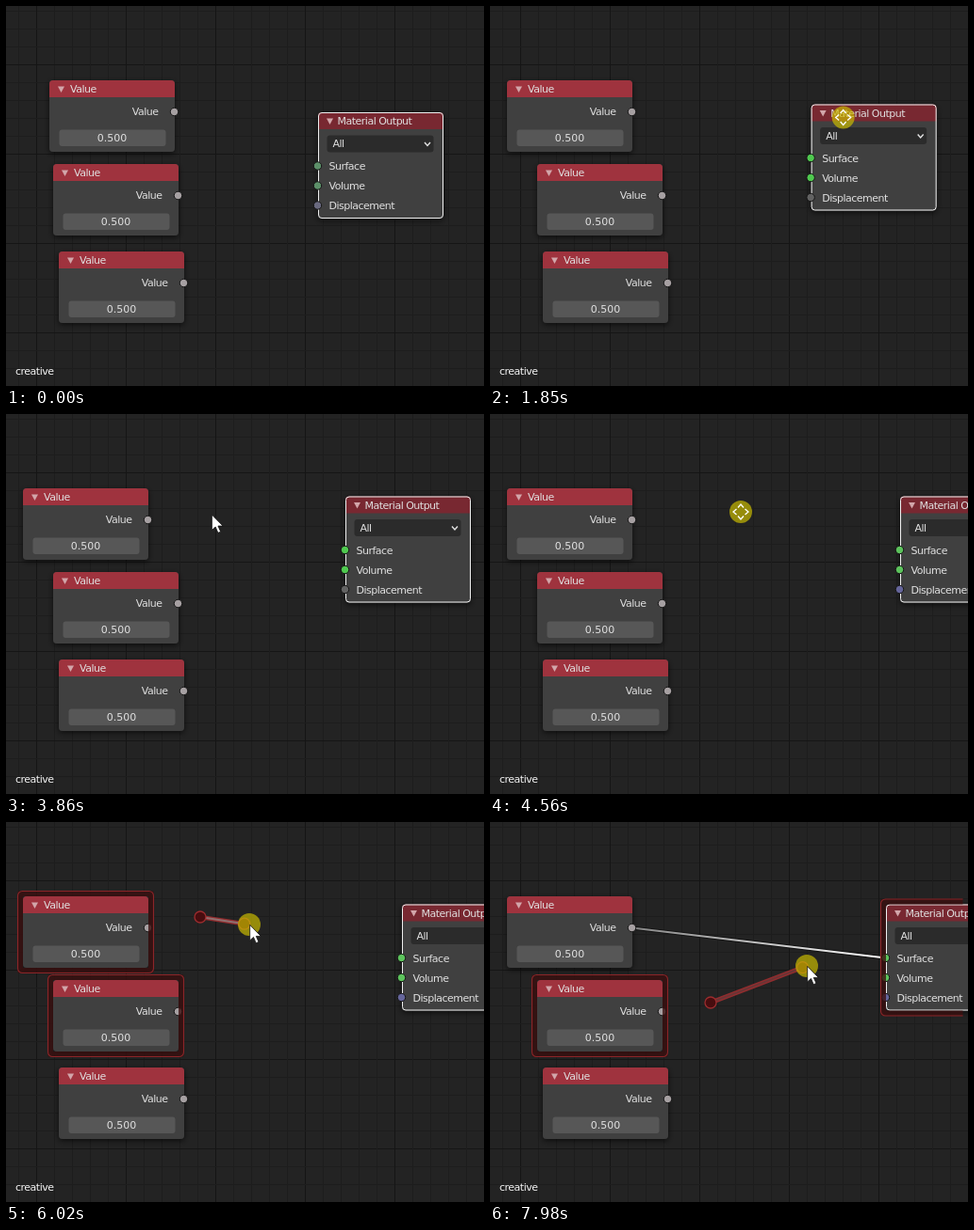
An HTML page that plays this animation: 507 px wide and 404 px high, repeating every 8000 ms.

```html
<!DOCTYPE html>
<html lang="en">
<head>
<meta charset="utf-8">
<title>Node editor</title>
<style>
  html, body { margin: 0; width: 100%; height: 100%; overflow: hidden; background: #232323; }
  svg { display: block; }
  text { font: 11px "DejaVu Sans", sans-serif; letter-spacing: -.5px; fill: #e0e0e0; }
  .num { letter-spacing: 0; text-anchor: middle; }
  .end { text-anchor: end; }
  .socket { stroke: #161616; stroke-width: 1; }
  .frame { fill: none; }
  .on .frame { stroke: #f0f0f0; stroke-width: 1; }
  .ring { fill: #3a1010; fill-opacity: .8; fill-rule: evenodd; }
  .edge { fill: none; stroke: #8c2528; stroke-width: 1.1; }
</style>
</head>
<body>
<svg id="stage" width="507" height="404" viewBox="0 0 507 404">
  <defs>
    <filter id="shadow" x="-20%" y="-20%" width="140%" height="150%">
      <feDropShadow dx="0" dy="2" stdDeviation="3" flood-color="#000" flood-opacity=".65"/>
    </filter>
    <linearGradient id="fade" gradientUnits="userSpaceOnUse" x1="150" y1="112" x2="420" y2="144">
      <stop offset="0" stop-color="#858585"/><stop offset="1" stop-color="#fff"/>
    </linearGradient>
    <clipPath id="view"><rect width="501.500" height="404"/></clipPath>
  </defs>
  <rect width="507" height="404" fill="#232323"/>
  <g id="grid"></g>
  <g id="link">
    <path d="M150.500 112.500L419.500 144.500" stroke="#141414" stroke-width="4"/>
    <path d="M150.500 112.500L419.500 144.500" stroke="url(#fade)" stroke-width="2"/>
  </g>
  <g id="nodes"></g>
  <text x="10" y="392" style="fill:#f4f4f4">creative</text>
  <g id="marks" clip-path="url(#view)"></g>
  <g id="lazy">
    <line class="l" stroke="#932c2e" stroke-width="4.600"/>
    <line class="l" id="core" stroke-width="2"/>
    <g fill="#470d0f" stroke="#9c2c2e" stroke-width="1.300">
      <circle id="from" r="6"/><circle id="to" r="6"/>
    </g>
  </g>
  <g id="pointer">
    <circle id="press" r="12" fill="#cdbe00" fill-opacity=".68"/>
    <path id="arrow" transform="translate(.7 .4)" d="M0 0V16.500L3.800 13L6.500 19.300L9.300 18.100L6.600 12H11.700Z" fill="#fff" stroke="#111" stroke-width=".8"/>
    <g id="move" fill="none" stroke="#fff" stroke-width="1.300"></g>
  </g>
</svg>
<script>
const LOOP = 8000, TICK = 77.5, LEAD = 15;
const $ = id => document.getElementById(id);
const show = (id, on) => $(id).style.display = on ? "" : "none";

// Pointer path: tick, x, y
const PATH = [
  [1, 431, 343], [6, 270, 212], [11, 145, 97], [13, 145, 97], [14, 123, 97], [15, 117, 97], [16, 117, 97],
  [22, 365, 127], [23, 365, 127], [26, 394, 101.5], [28, 394, 101.5],
  [34, 270, 111], [44, 270, 111], [48, 231, 108], [49, 231, 108],
  [52, 191, 104], [53, 191, 104], [59, 266, 104], [60, 293, 104], [61, 300, 104], [62, 300, 104],
  [66, 251, 104], [69, 251, 104], [73, 206, 101], [74, 206, 101],
  [80, 310, 117], [82, 340, 115], [84, 353, 108], [88, 353, 108],
  [91, 320, 140], [92, 320, 140], [95, 234, 192], [96, 234, 192], [103, 336, 153]
];
// Tick ranges, end excluded
const PRESS = [[12, 17], [22, 29], [53, 67], [74, 87], [96, 104]];
const MOVE = [[14, 17], [24, 29], [53, 67]];
const within = (k, spans) => spans.some(([a, b]) => k >= a && k < b);

function pointerAt(k) {
  const i = PATH.findIndex(p => p[0] >= k);
  if (i <= 0) return PATH[0].slice(1);
  const [a, x, y] = PATH[i - 1], [b, u, v] = PATH[i];
  const f = (k - a) / (b - a);
  return [x + (u - x) * f, y + (v - y) * f];
}

const shell = (h, head) => `
  <rect width="133" height="${h}" rx="4" fill="#404040" filter="url(#shadow)"/>
  <path d="M0 18V4Q0 0 4 0H129Q133 0 133 4V18Z" fill="${head}"/>
  <path d="M9 6.500H16L12.500 13Z" fill="#d2a6aa"/>
  <rect class="frame" x=".5" y=".5" width="132" height="${h - 1}" rx="3.500"/>`;
const socket = (x, y, fill) => `<circle class="socket" cx="${x}" cy="${y}" r="4.200" fill="${fill}"/>`;

const valueNode = id => `<g id="${id}">${shell(76, "#9f333e")}
  <text x="22" y="13">Value</text>
  <text class="end" x="115.500" y="37">Value</text>
  <rect x="10.500" y="52.500" width="113" height="17.500" rx="3" fill="#575757"/>
  <text class="num" x="66.500" y="65">0.500</text>
  ${socket(132.5, 33.5, "#a6a0a2")}</g>`;

const outputNode = `<g id="out">${shell(113, "#782831")}
  <text x="20.500" y="13">Material Output</text>
  <rect x="9.500" y="24.500" width="113" height="18" rx="3" fill="#2b2b2b"/>
  <text x="15.500" y="37">All</text>
  <path d="M113 32L116 35.500L119 32" fill="none" stroke="#e2e2e2" stroke-width="1.400"/>
  ${["Surface", "Volume", "Displacement"].map((s, i) =>
    `<text x="11.500" y="${61 + 21 * i}">${s}</text>` + socket(-.5, 57 + 21 * i, "#555")).join("")}</g>`;

const mark = (id, h) => `<g id="${id}">
  <path class="ring" d="M-5.500 -5.500H138.500V${h + 5.5}H-5.500ZM0 0V${h}H133V0Z"/>
  <rect class="edge" x="-5.500" y="-5.500" width="144" height="${h + 11}" rx="5"/></g>`;

// Fine lines every 19 px, a darker one at each fifth
function drawGrid() {
  const step = 19;
  let out = "";
  for (const i of Array(28).keys()) {
    const x = 13.5 + i * step, y = 5.5 + i * step;
    const tone = major => major ? "#151515" : "#1d1d1d";
    out += `<path d="M${x} 0V404" stroke="${tone(i % 5 === 1)}"/>`;
    out += `<path d="M0 ${y}H507" stroke="${tone(i % 5 === 3)}"/>`;
  }
  $("grid").innerHTML = out;
}

drawGrid();
$("nodes").innerHTML = ["v3", "v2", "v1"].map(valueNode).join("") + outputNode;
$("marks").innerHTML = mark("m1", 76) + mark("m2", 76) + mark("mo", 113);
$("move").innerHTML = [0, 90, 180, 270].map(a =>
  `<path transform="rotate(${a})" d="M-3 -4.500L0 -8L3 -4.500"/>`).join("");
const outSockets = document.querySelectorAll("#out .socket");
const lines = document.querySelectorAll("#lazy .l");

const place = (id, x, y) => $(id).setAttribute("transform", `translate(${x} ${y})`);
const set = (el, attrs) => { for (const a in attrs) el.setAttribute(a, attrs[a]); };

function outputPos(k, x, y) {
  if (k < 23) return [331, 113];
  if (k < 29) return [x - 34, y - 14];
  if (k < 53) return [360, 87.5];
  if (k < 67) return [360 + x - 191, 87.5];
  return [420, 87.5];
}

function socketColors(k) {
  if (k < 23) return ["#5c9069", "#5c9069", "#69697f"];
  if (k < 53) return ["#4fc84f", "#4fc84f", "#626262"];
  return ["#5cc25c", "#5cc25c", "#65659a"];
}

function draw(k) {
  const [x, y] = pointerAt(k);
  const out = outputPos(k, x, y);
  const first = k < 14 ? 46 : k < 17 ? x - 99 : 18;
  place("v1", first, 79);
  place("v2", 50, 168);
  place("v3", 56, 261);
  place("out", ...out);
  $("v1").classList.toggle("on", k >= 12 && k < 22);
  $("out").classList.toggle("on", k < 12 || k >= 22);
  socketColors(k).forEach((c, i) => outSockets[i].setAttribute("fill", c));

  // Lazy connect: rings around the two nodes, line between press and pointer
  const one = k >= 74 && k < 89, two = k >= 96;
  place("m1", 18, 79);
  place("m2", 50, 168);
  place("mo", ...out);
  show("m1", one);
  show("m2", two || (k >= 76 && k < 78));
  show("mo", (one && k >= 78) || k >= 99);
  show("lazy", one || two);
  const [ax, ay] = one ? [206, 101] : [234, 192];
  const [bx, by] = pointerAt(k - .3);
  lines.forEach(l => set(l, { x1: ax, y1: ay, x2: bx, y2: by }));
  $("core").setAttribute("stroke", one ? "#907070" : "#6b3435");
  set($("from"), { cx: ax, cy: ay });
  set($("to"), { cx: bx, cy: by });
  show("link", k >= 89);

  const moving = within(k, MOVE);
  place("pointer", x, y);
  show("pointer", k > 0);
  show("press", within(k, PRESS));
  show("arrow", !moving);
  show("move", moving);
}

const start = performance.now();
function loop() {
  const t = (performance.now() - start) % LOOP;
  draw(Math.floor((t + LEAD) / TICK));
  requestAnimationFrame(loop);
}
loop();
</script>
</body>
</html>
```
